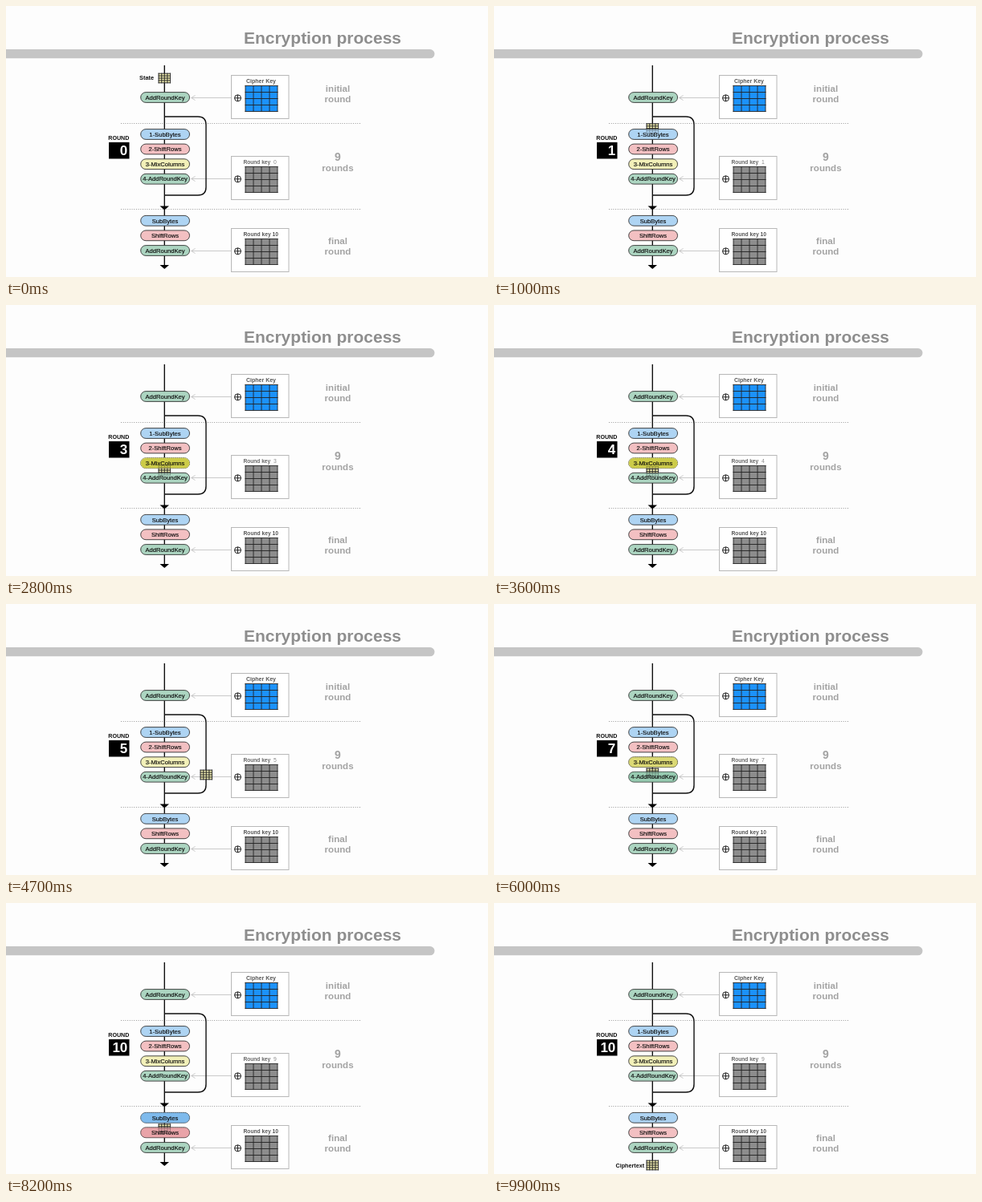
An HTML page that plays this animation: 600 by 338 pixels, repeating every 10000 ms.

```html
<!DOCTYPE html>
<html lang="en">
<head>
<meta charset="utf-8">
<title>Encryption process</title>
<style>
html, body { margin: 0; width: 100%; height: 100%; overflow: hidden; background: #fdfdfd; }
svg { display: block; width: 600px; height: 338px; font-family: "Liberation Sans", Arial, sans-serif; }
.bold { font-weight: bold; }
.mid { text-anchor: middle; }
.end { text-anchor: end; }
.side { fill: #a3a3a3; font-size: 11.6px; font-weight: bold; text-anchor: middle; }
.op { font-size: 7.6px; text-anchor: middle; stroke: #000; stroke-width: .15; }
.flow { fill: none; stroke: #111; stroke-width: 1.4; }
</style>
</head>
<body>
<svg id="stage" viewBox="0 0 600 338"></svg>
<script>
const NS = "http://www.w3.org/2000/svg";
const stage = document.getElementById("stage");

function add(tag, attrs, parent = stage) {
  const el = document.createElementNS(NS, tag);
  for (const k in attrs) el.setAttribute(k, attrs[k]);
  parent.appendChild(el);
  return el;
}

function text(str, x, y, size, cls = "", fill = "#111") {
  const el = add("text", { x, y, "font-size": size, class: cls, fill });
  el.textContent = str;
  return el;
}

// 4 x 4 grid lines including the outer border
function grid(x, y, w, h, stroke, width, fill, parent = stage) {
  let d = "";
  for (let i = 0; i <= 4; i++) {
    d += `M${x + w * i / 4} ${y}v${h}M${x} ${y + h * i / 4}h${w}`;
  }
  add("rect", { x, y, width: w, height: h, fill }, parent);
  add("path", { d, stroke, "stroke-width": width, "stroke-linecap": "square" }, parent);
}

function keyPanel(top, label, size, labelFill, cellFill, align) {
  const mid = top + 28;
  add("rect", { x: 280.5, y: top, width: 71.5, height: 54, fill: "#fff", stroke: "#b8b8b8", "stroke-width": 1 });
  add("path", { d: `M280 ${mid}H231M235.5 ${mid - 3}L230.5 ${mid}L235.5 ${mid + 3}`, fill: "none", stroke: "#cacaca", "stroke-width": 1 });
  add("circle", { cx: 288.5, cy: mid + .3, r: 4, fill: "none", stroke: "#222", "stroke-width": 1 });
  add("path", { d: `M284.5 ${mid + .3}h8M288.5 ${mid - 3.7}v8`, stroke: "#222", "stroke-width": 1 });
  grid(298, top + 13, 40, 32, "#222", .9, cellFill);
  text(label, align === "mid" ? 317.5 : 295.5, top + 9.3, size, "bold " + align, labelFill);
}

const GREEN = ["#acd5c1", "#6bb690"], BLUE = ["#aed4f3", "#5ca8e8"];
const PINK = ["#f3c0c2", "#d9707a"], YELLOW = ["#f2f0b8", "#cccb48"];
const OPS = [
  ["AddRoundKey", 114, GREEN], ["1-SubBytes", 160, BLUE], ["2-ShiftRows", 178.5, PINK],
  ["3-MixColumns", 197.2, YELLOW], ["4-AddRoundKey", 215.7, GREEN],
  ["SubBytes", 267.8, BLUE], ["ShiftRows", 286.3, PINK], ["AddRoundKey", 305, GREEN]
];

// Fixed scenery
text("Encryption process", 492, 47.3, 21, "bold end", "#8e8e8e");
add("rect", { x: -20, y: 54, width: 553.5, height: 11.3, rx: 5.6, fill: "#c5c5c5" });
for (const y of [146.5, 253.5]) {
  add("path", { d: `M143 ${y}H441`, stroke: "#999", "stroke-width": 1, "stroke-dasharray": "1 1.7" });
}
[["initial", 107], ["round", 120], ["rounds", 206], ["final", 296.5], ["round", 309.5]]
  .forEach(([s, y]) => text(s, 413, y, 11.6, "side"));
text("9", 413, 193, 14, "bold mid", "#a3a3a3");

keyPanel(86.5, "Cipher Key", 7, "#555", "#1c92fb", "mid");
keyPanel(187.5, "Round key", 6.6, "#666", "#8d8d8d", "");
keyPanel(277.5, "Round key 10", 6.7, "#555", "#8d8d8d", "");
const keyNum = text("0", 333, 196.8, 6.8, "", "#888");

add("path", { class: "flow", d: "M197.3 74V326M197 138H239Q249 138 249 148V226Q249 236 239 236H197" });
for (const y of [249.5, 323]) add("path", { d: `M191.5 ${y}h11.5l-5.75 5z`, fill: "#000" });

text("ROUND", 127.3, 167, 7.1, "bold");
add("rect", { x: 128, y: 170, width: 25.5, height: 20.5, fill: "#000" });
const roundNum = text("0", 151.3, 186.2, 17, "bold end", "#fff");
const stateLabel = text("State", 166, 92.3, 7.4, "bold");
const cipherLabel = text("Ciphertext", 151.5, 329.6, 7.2, "bold");

// Travelling block; its lines also shine faintly through the pills
const block = add("g", {});
grid(-7.2, -5.8, 14.4, 11.6, "#222", .8, "#f4f1b4", block);

const pillAt = y => ({ x: 167.7, y: y - 6.4, width: 60.8, height: 12.8, rx: 6.4 });
const glows = OPS.map(([, y, [base, hot]]) => {
  add("rect", { ...pillAt(y), fill: base, stroke: "#333", "stroke-width": .9 });
  return add("rect", { ...pillAt(y), fill: hot, stroke: base, "stroke-width": .9, "stroke-dasharray": "1 1.5" });
});
const ghost = add("g", { opacity: .4 });
grid(-7.2, -5.8, 14.4, 11.6, "#222", .8, "none", ghost);
OPS.forEach(([name, y]) => text(name, 198, y + 2.7, 7.6, "op"));

// Motion
const clamp = v => Math.max(0, Math.min(1, v));

function along(points, t) {
  let [pt, pv] = points[0];
  for (const [qt, qv] of points) {
    if (t < qt) return pv + (qv - pv) * clamp((t - pt) / (qt - pt));
    pt = qt; pv = qv;
  }
  return pv;
}

const LOOP = 10000, FIRST = 960, ROUND = 790, LEAVE = 7700;
const INTRO = [[0, 90], [150, 90], [420, 107], [640, 120], [960, 138]];
const LAP = [[0, 0], [60, 22], [105, 40], [150, 52], [270, 69.5], [300, 73], [370, 82],
  [420, 98], [500, 130], [580, 173], [610, 190], [710, 248], [790, 300]];
const OUTRO = [[7700, 236], [7950, 260], [8150, 277], [8350, 296], [8550, 312], [8700, 327]];

// Distance round the rectangular loop, clockwise from the upper join
function lapPoint(s) {
  if (s < 98) return [197, 138 + s];
  if (s < 150) return [99 + s, 236];
  if (s < 248) return [249, 386 - s];
  return [497 - s, 138];
}

function place(t) {
  if (t < FIRST) return [197, along(INTRO, t)];
  if (t >= LEAVE) return [197, along(OUTRO, t)];
  return lapPoint(along(LAP, (t - FIRST) % ROUND));
}

function roundOf(t) {
  if (t < FIRST) return 0;
  return t >= 7850 ? 10 : Math.min(9, 1 + Math.floor((t - FIRST) / ROUND));
}

function draw(t) {
  const [x, y] = place(t), n = roundOf(t);
  const pos = `translate(${x + .3} ${y})`;
  block.setAttribute("transform", pos);
  ghost.setAttribute("transform", pos);
  roundNum.textContent = n;
  keyNum.textContent = Math.min(9, n);
  stateLabel.setAttribute("opacity", clamp(1 - (t - 100) / 250));
  cipherLabel.setAttribute("opacity", clamp((t - 8650) / 200));
  OPS.forEach(([, py], i) => {
    const d = y - py;
    const heat = x === 197 ? Math.min(clamp((d + 7) / 7), clamp((18 - d) / 7)) : 0;
    glows[i].setAttribute("opacity", heat);
  });
}

const start = performance.now();
function tick() {
  const t = (performance.now() - start) % LOOP;
  draw(Math.floor(t / 100) * 100);
  requestAnimationFrame(tick);
}
tick();
</script>
</body>
</html>
```
